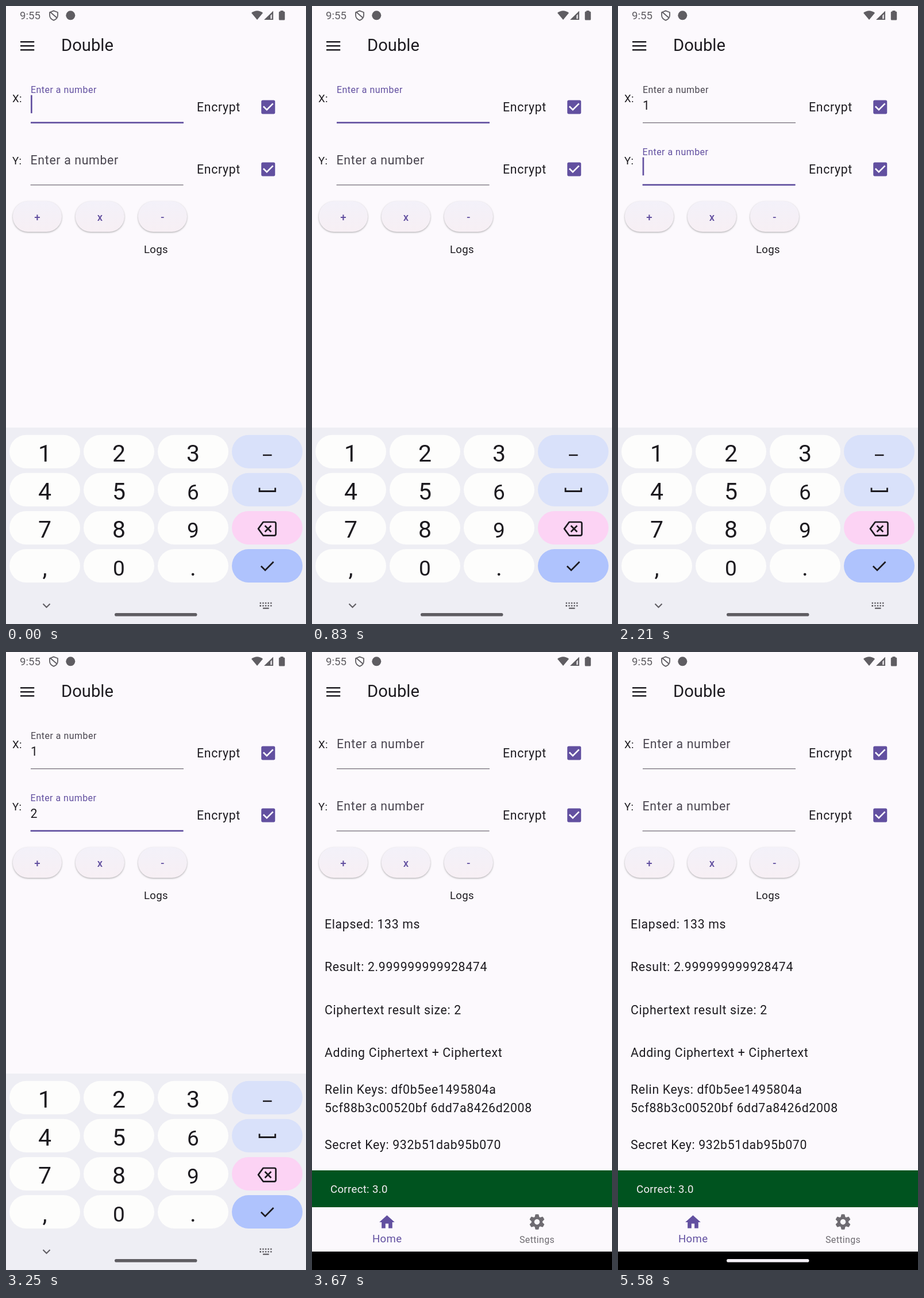
Recreate the animation shown at these times as an HTML page with a canvas. Size 522x1073 px, loop 5.62 s.

```html
<!DOCTYPE html>
<html lang="en">
<head>
<meta charset="utf-8">
<title>Double</title>
<style>
html, body { margin: 0; width: 100%; height: 100%; overflow: hidden; background: #fcf9fd; }
canvas { display: block; width: 522px; height: 1073px; }
</style>
</head>
<body>
<canvas id="stage"></canvas>
<script>
const W = 522, H = 1073, LOOP = 5620;
const canvas = document.getElementById('stage');
const dpr = window.devicePixelRatio || 1;
canvas.width = W * dpr;
canvas.height = H * dpr;
const g = canvas.getContext('2d');

const BG = '#fcf9fd', INK = '#1d1b20', PURPLE = '#6250a0', GREY = '#5f5d62', LABEL = '#49454f';
const BODY = 21.27, SMALL = 18.6;

// Event times in ms
const T = { typeX: 1210, focusY: 2040, typeY: 2710, clear: 3500, done: 3540, closed: 3660 };

const clamp = v => Math.max(0, Math.min(1, v));
const ease = v => { v = clamp(v); return v * v * (3 - 2 * v); };
const mix = (a, b, k) => a + (b - a) * k;

function text(s, x, y, size, color = INK, spacing = 0, weight = 400, align = 'left') {
  g.font = `${weight} ${size}px Roboto, sans-serif`;
  g.letterSpacing = spacing + 'px';
  g.textAlign = align;
  g.fillStyle = color;
  g.fillText(s, x, y);
}
const body = (s, x, y, color) => text(s, x, y, BODY, color, 0.665);
const small = (s, x, y, color) => text(s, x, y, SMALL, color, 0.33);

function rect(x, y, w, h, color) {
  g.fillStyle = color;
  g.fillRect(x, y, w, h);
}
function round(x, y, w, h, r, color) {
  g.fillStyle = color;
  g.beginPath();
  g.roundRect(x, y, w, h, r);
  g.fill();
}
function disc(x, y, r, color) {
  g.fillStyle = color;
  g.beginPath();
  g.arc(x, y, r, 0, 7);
  g.fill();
}
function fillPath(d, color) {
  g.fillStyle = color;
  g.fill(new Path2D(d));
}
function line(d, color, width) {
  g.strokeStyle = color;
  g.lineWidth = width;
  g.stroke(new Path2D(d));
}

function statusBar() {
  text('9:55', 24, 23.2, SMALL, GREY);
  line('M83 8.3 L90 11 V16 Q90 22 83 24.8 Q76 22 76 16 V11 Z M77 10.5 L88.5 20.5', GREY, 1.8);
  disc(112.3, 16.3, 8, GREY);
  fillPath('M427 12 Q437 4.5 447 12 L437 24 Z', GREY);
  fillPath('M465 8.5 V24 H449 Z', GREY);
  fillPath('M463 14 V22.3 H460 V16.5 Z', '#d5d2d7');
  round(474.8, 9.5, 10.4, 15, 1.5, GREY);
  rect(477.5, 8, 5, 2, GREY);
}

function header() {
  for (const y of [61, 68, 75]) rect(25, y, 24.2, 2.5, INK);
  text('Double', 96, 78.4, 29.2);
}

function checkbox(x, y) {
  round(x, y, 24, 24, 2.6, PURPLE);
  line(`M${x + 3.6} ${y + 10.8} l6 6 l10.8 -10.8`, '#fff', 2.66);
}

// lift: 0 = resting label, 1 = floating label
function field(name, x, y, { lift, focus, value, caret }) {
  small(name, 11, y + 6.6);
  const size = mix(BODY, BODY * 0.75, lift);
  text('Enter a number', x, mix(y + 7.2, y - 9.4, lift), size,
    focus ? PURPLE : LABEL, 0.665 * size / BODY);
  if (value) body(value, x, y + 20);
  if (caret) rect(x + (value ? 12.9 : 0), y - 5.3, 2.66, 31.5, PURPLE);
  if (focus) rect(x, y + 41.2, 266, 2.66, PURPLE);
  else rect(x, y + 42, 266, 1.33, '#79747e');
  body('Encrypt', 332, y + 22.5);
  checkbox(444.2, y + 3.4);
}

function button(label, x) {
  const fill = g.createLinearGradient(0, 339, 0, 392);
  fill.addColorStop(0, '#f3f1f9');
  fill.addColorStop(1, '#f7eff4');
  g.save();
  g.shadowColor = 'rgba(0,0,0,.3)';
  g.shadowBlur = 3 * dpr;
  g.shadowOffsetY = 1.3 * dpr;
  round(x, 339, 85.2, 53, 26.5, fill);
  g.restore();
  text(label, x + 42.6, 372.6, SMALL, PURPLE, 0, 500, 'center');
}

function results() {
  body('Elapsed: 133 ms', 22, 479.8);
  body('Result: 2.999999999928474', 22, 554.4);
  body('Ciphertext result size: 2', 22, 629);
  body('Adding Ciphertext + Ciphertext', 22, 703.4);
  body('Relin Keys: df0b5ee1495804a', 22, 767.2);
  body('5cf88b3c00520bf 6dd7a8426d2008', 22, 799);
  body('Secret Key: 932b51dab95b070', 22, 863);
}

function gear(x, y, color) {
  disc(x, y, 9.6, color);
  for (let i = 0; i < 6; i++) {
    g.save();
    g.translate(x, y);
    g.rotate(i * Math.PI / 3);
    fillPath('M-4.6 -6 L-3 -12.6 Q-2.9 -13.3 -2.2 -13.3 H2.2 Q2.9 -13.3 3 -12.6 L4.6 -6 Z', color);
    g.restore();
  }
  disc(x, y, 4.7, BG);
}

function bottomBar() {
  rect(0, 900, W, 64, '#00531f');
  small('Correct: 3.0', 32, 938.6, '#f5eff7');
  rect(0, 964, W, 77, BG);
  g.save();
  g.translate(114.5, 974);
  g.scale(1.33, 1.33);
  fillPath('M10 20v-6h4v6h5v-8h3L12 3 2 12h3v8z', PURPLE);
  g.restore();
  small('Home', 105, 1025.2, PURPLE);
  gear(391.5, 989.5, '#6f6c72');
  text('Settings', 361, 1026.2, 16, '#6f6c72', 0.33);
  rect(0, 1041, W, 32, '#000');
}

function keyboard() {
  rect(0, 732, W, 345, '#eeeef4');
  const keys = ['123', '456', '789', ',0.'];
  const accents = ['#d9e1fa', '#d9e1fa', '#fcd3f4', '#afc3fd'];
  keys.forEach((row, r) => {
    const top = 744.7 + r * 66.1;
    [...row].forEach((k, c) => {
      const x = 6 + c * 129;
      round(x, top, 123, 58, 29, '#fdfdfc');
      const size = '069'.includes(k) ? 37 : 41;
      text(k, x + 61.5, top + 46.1, size, INK, 0, 400, 'center');
    });
    round(393, top, 123, 58, 29, accents[r]);
  });
  rect(447, 778.6, 15.5, 2.5, INK);
  line('M441 836.5 V842.5 H468.5 V836.5', INK, 2.8);
  g.lineJoin = 'round';
  line('M447.5 896 H467 Q469.5 896 469.5 898.5 V916.5 Q469.5 919.3 467 919.3 H447.5 L439 907.6 Z', INK, 2.7);
  g.lineJoin = 'miter';
  line('M450.5 902.3 L461.3 913 M461.3 902.3 L450.5 913', INK, 2.7);
  line('M443.8 972.5 L451 979.7 L465.5 965', INK, 2.7);
  line('M64.5 1038 L70.5 1044 L76.5 1038', GREY, 2.1);
  for (let r = 0; r < 2; r++)
    for (let c = 0; c < 5; c++) rect(441.6 + c * 4.6, 1035.5 + r * 4.6, 2.4, 2.4, GREY);
  rect(441.6, 1040.1, 2.4, 2.4, GREY);
  rect(447, 1044.6, 10.5, 2.2, GREY);
}

const pill = color => round(189, 1054, 143.5, 5.6, 2.8, color);

function draw(t) {
  g.setTransform(dpr, 0, 0, dpr, 0, 0);
  rect(0, 0, W, H, BG);
  statusBar();
  header();

  const cleared = t >= T.clear;
  const focusY = t >= T.focusY && !cleared;
  const focusX = t < T.focusY;
  const drop = 1 - ease((t - T.clear) / 160);
  // The caret blinks every 500 ms, restarting on focus or typing
  const since = t >= T.typeY ? T.typeY : focusY ? T.focusY : t >= T.typeX ? T.typeX : -20;
  const blink = (t - since) % 1000 < 500;

  field('X:', 43, 160, {
    lift: drop, focus: focusX, value: t >= T.typeX && !cleared ? '1' : '', caret: focusX && blink
  });
  field('Y:', 42.6, 268, {
    lift: Math.min(drop, ease((t - T.focusY) / 160)), focus: focusY,
    value: t >= T.typeY && !cleared ? '2' : '', caret: focusY && blink
  });
  ['+', 'x', '-'].forEach((s, i) => button(s, 11.8 + i * 109));
  small('Logs', 240, 429.4);

  if (t >= T.done) {
    results();
    bottomBar();
  }
  if (t < T.closed) {
    g.save();
    g.translate(0, 341 * ease((t - T.done) / (T.closed - T.done)));
    keyboard();
    g.restore();
  }
  if (t < T.done) pill(GREY);
  g.globalAlpha = clamp((t - 3740) / 200);
  pill('#f4f0f6');
  g.globalAlpha = 1;
}

const start = performance.now();
function tick() {
  draw((performance.now() - start) % LOOP);
  requestAnimationFrame(tick);
}
tick();
</script>
</body>
</html>
```
